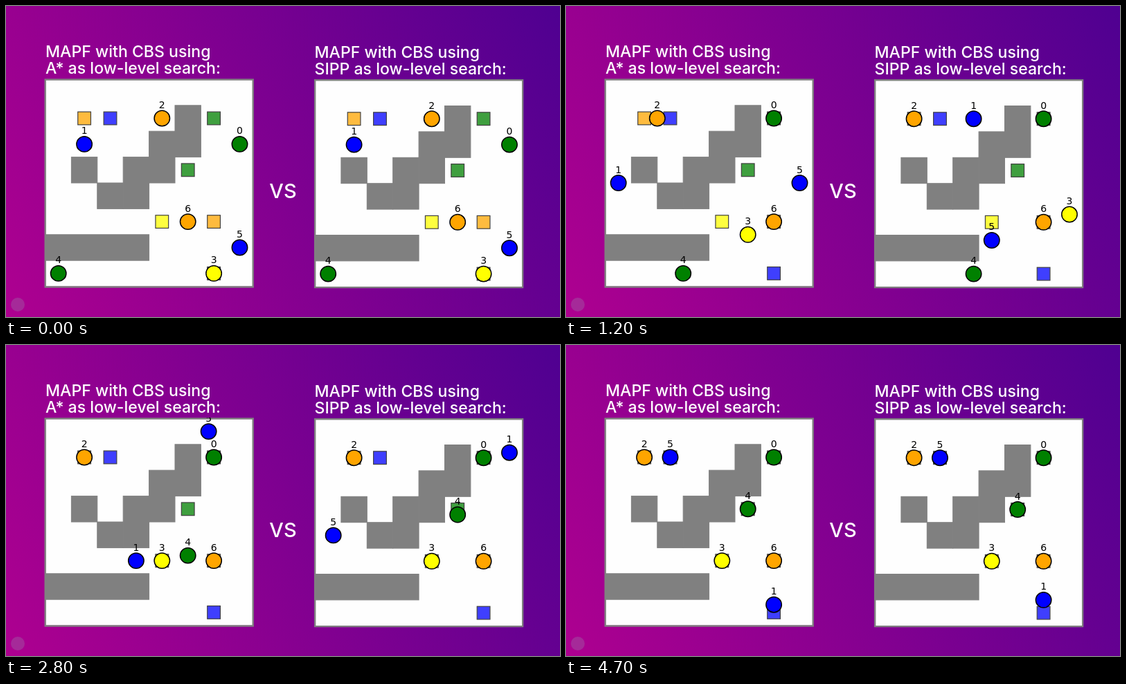
These frames come from a looping animation (800x450 px, 4.8 s). An HTML page:

```html
<!DOCTYPE html>
<html lang="en">
<head>
<meta charset="utf-8">
<title>MAPF with CBS: A* vs SIPP</title>
<style>
  html, body { margin: 0; width: 100%; height: 100%; overflow: hidden; }
  body { background: linear-gradient(63deg, #ae0090, #4f0091); }
  svg { display: block; width: 800px; height: 450px; }
  .title { font: 500 23.1px Inter, sans-serif; fill: #fff; }
  .versus { font: 500 29px Inter, sans-serif; fill: #fff; text-anchor: middle; }
  .label { font: 14px "DejaVu Sans", sans-serif; text-anchor: middle; }
  .wall { fill: #808080; stroke: #808080; stroke-width: 1; }
  .goal { stroke: #000; stroke-width: 1.2; opacity: .75; }
  .agent { stroke: #000; stroke-width: 1.5; }
  .frame { fill: none; stroke: #808080; stroke-width: 2.4; }
</style>
</head>
<body>
<svg id="stage" viewBox="0 0 800 450">
  <text class="title" x="57" y="74">MAPF with CBS using</text>
  <text class="title" x="57" y="97.5">A* as low-level search:</text>
  <text class="title" x="445.5" y="75">MAPF with CBS using</text>
  <text class="title" x="445.5" y="98.5">SIPP as low-level search:</text>
  <text class="versus" x="400" y="278">VS</text>
  <circle cx="17" cy="432" r="10" fill="#a52a99"/>
</svg>
<script>
const LOOP = 4800, FRAME = 100, CELL = 37.4, SIZE = 8 * CELL;
const NS = 'http://www.w3.org/2000/svg';
const stage = document.getElementById('stage');
const COLORS = ['green', 'blue', 'orange', 'yellow', 'green', 'blue', 'orange'];
const GOALS = ['61', '67', '11', '45', '53', '21', '65'];
// column, row, width, height in cells
const WALLS = [[5, 1, 1, 2], [4, 2, 1, 2], [3, 3, 1, 2], [2, 4, 1, 1], [1, 3, 1, 1], [0, 6, 4, 1]];
const MOVES = { U: [0, -1], D: [0, 1], L: [-1, 0], R: [1, 0], W: [0, 0] };

// Each plan is a start cell followed by one move per time step.
const BOARDS = [
  { x: 57, y: 106.4, speed: 2.9, delay: .905, plans: [
    '72UL', '12LDDRDRRWRRDRD', '41LLL', '67ULULWUDWUD', '07RRRRURUUU', '76UUUUUULLLLLD', '55R' ] },
  { x: 446.5, y: 107.1, speed: 3.48, delay: .85, plans: [
    '72LU', '12RRURURRRDDDDDDLD', '41LLL', '67RUUULLLD', '07RRRRRUUUU', '76LLLULLLULUURRU', '55R' ] }
];

function add(parent, tag, attrs, text) {
  const el = document.createElementNS(NS, tag);
  for (const key in attrs) el.setAttribute(key, attrs[key]);
  if (text !== undefined) el.textContent = text;
  parent.appendChild(el);
  return el;
}

function parsePlan(plan) {
  let [x, y] = [+plan[0], +plan[1]];
  const path = [[x, y]];
  for (const move of plan.slice(2)) {
    x += MOVES[move][0];
    y += MOVES[move][1];
    path.push([x, y]);
  }
  return path;
}

function positionAt(path, t) {
  const last = path.length - 1;
  const i = Math.min(Math.floor(t), last);
  const [a, b] = [path[i], path[Math.min(i + 1, last)]];
  return a.map((v, k) => (v + (b[k] - v) * (t - i) + .5) * CELL);
}

function buildBoard(board, index) {
  const clip = add(stage, 'clipPath', { id: 'clip' + index });
  add(clip, 'rect', { x: -2, y: -1.5, width: SIZE + 4, height: SIZE + 4 });
  const root = add(stage, 'g', {
    transform: `translate(${board.x} ${board.y})`, 'clip-path': `url(#clip${index})`
  });
  add(root, 'rect', { width: SIZE, height: SIZE, fill: '#fefefe' });
  for (const [x, y, w, h] of WALLS)
    add(root, 'rect', { class: 'wall', x: x * CELL, y: y * CELL, width: w * CELL, height: h * CELL });
  add(root, 'rect', { class: 'frame', x: -.3, y: .1, width: SIZE + .8, height: SIZE + .8 });
  GOALS.forEach((cell, i) => add(root, 'rect', {
    class: 'goal', fill: COLORS[i], width: CELL / 2, height: CELL / 2,
    x: (+cell[0] + .25) * CELL, y: (+cell[1] + .25) * CELL
  }));
  const discs = add(root, 'g'), labels = add(root, 'g');
  board.agents = board.plans.map((plan, i) => ({
    path: parsePlan(plan),
    disc: add(discs, 'circle', { class: 'agent', r: .3 * CELL, fill: COLORS[i] }),
    label: add(labels, 'text', { class: 'label', y: -14.5 }, i)
  }));
}

function draw(ms) {
  const seconds = Math.floor(ms / FRAME) * FRAME / 1000;
  for (const { speed, delay, agents } of BOARDS) {
    // The plans play back in tenths of a time step.
    const t = Math.max(0, Math.floor((seconds * speed - delay) * 10) / 10);
    for (const { path, disc, label } of agents) {
      const move = `translate(${positionAt(path, t).join(' ')})`;
      disc.setAttribute('transform', move);
      label.setAttribute('transform', move);
    }
  }
}

BOARDS.forEach(buildBoard);
const start = performance.now();
function tick() {
  draw((performance.now() - start) % LOOP);
  requestAnimationFrame(tick);
}
tick();
</script>
</body>
</html>
```
